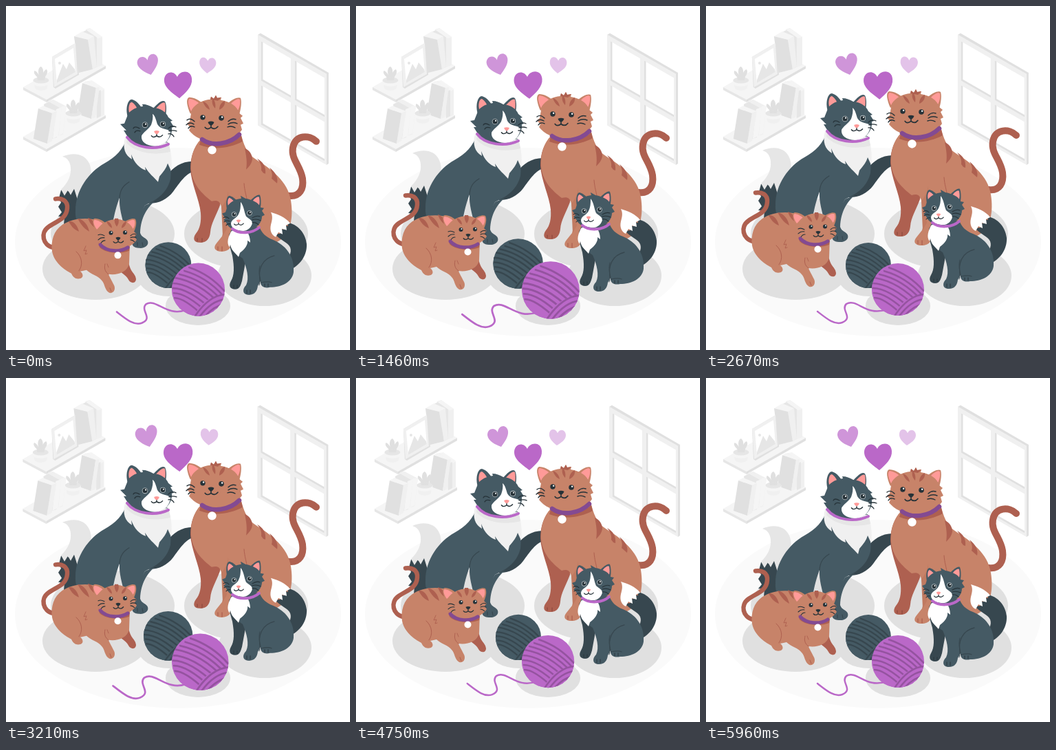
An HTML page with a canvas for the animation above (6 s loop, 500 by 500 pixels).

```html
<!DOCTYPE html>
<html lang="en">
<head>
<meta charset="utf-8">
<title>Cat family</title>
<style>
html, body { margin: 0; width: 100%; height: 100%; overflow: hidden; background: #fff; }
canvas { display: block; width: 100vw; height: 100vh; }
</style>
</head>
<body>
<canvas id="stage"></canvas>
<script>
const canvas = document.getElementById('stage');
const g = canvas.getContext('2d');
const LOOP = 6000, LEAD = 40;

const INK = '#263238', SLATE = '#455a64', DEEP = '#37474f';
const FUR = '#c78369', RUST = '#ae6050', PINK = '#ff9a98';
const LILAC = '#ba68c8', PLUM = '#834a92';
const G1 = '#fafafa', G2 = '#f5f5f5', G3 = '#f0f0f0', G4 = '#e6e6e6', G5 = '#e0e0e0';

const cache = new Map();
function path(d) {
  if (!cache.has(d)) cache.set(d, new Path2D(d));
  return cache.get(d);
}
function fill(d, c) { g.fillStyle = c; g.fill(path(d)); }
function line(d, c, w) {
  g.strokeStyle = c;
  g.lineWidth = w;
  g.lineCap = g.lineJoin = 'round';
  g.stroke(path(d));
}
function oval(x, y, rx, ry, c) {
  g.fillStyle = c;
  g.beginPath();
  g.ellipse(x, y, rx, ry, 0, 0, Math.PI * 2);
  g.fill();
}
function dot(x, y, r, c) { oval(x, y, r, r, c); }

// Piecewise linear value through [position, value] stops
function track(stops, p) {
  for (let i = 1; i < stops.length; i++) {
    const [a, u] = stops[i - 1], [b, v] = stops[i];
    if (p <= b) return u + (v - u) * (p - a) / (b - a);
  }
  return stops[stops.length - 1][1];
}
const BEAT = [[0, 1], [.1, 1.1], [.3, 1], [.4, 1], [.5, 1.1], [.6, 1], [1, 1]];
const SHAKE = [0, -1, 2, -4, 4, -4, 4, -4, 2, -1, 0].map((v, i) => [i / 10, v]);
const FLOAT = [[0, 0], [.5, -10], [1, 0]];

function shifted(x, y, draw) {
  g.save();
  g.translate(x, y);
  draw();
  g.restore();
}
function scaled(k, x, y, draw) {
  g.save();
  g.translate(x, y);
  g.scale(k, k);
  g.translate(-x, -y);
  draw();
  g.restore();
}

function floor() {
  oval(250, 343, 237, 137, G1);
  oval(155, 331, 90, 51, G5);
  oval(349, 331, 90, 51, G5);
  oval(130, 382, 77, 45, G5);
  oval(376, 392, 68, 44, G5);
  oval(237, 396, 44, 26, G5);
  oval(279, 436, 47, 28, G5);
}

function board(y) {
  shifted(0, y, () => {
    fill('M25 0 L112 -50 L145 -31 L59 18Z', G2);
    fill('M25 0 L59 18 V22 L25 4Z', G4);
    fill('M59 18 L145 -31 V-27 L59 22Z', G5);
  });
}
function pot(x, y) {
  shifted(x, y, () => {
    fill('M-3 -4 C-11 -9 -11 -14 -9 -15 C-5 -13 -3 -9 -2 -5 C-6 -15 -3 -20 0 -21 C4 -18 4 -12 2 -5 C2 -12 5 -16 8 -17 C11 -13 8 -8 3 -3Z', G5);
    fill('M-10 3 L-9 10 C-7 15 7 15 9 10 L10 3Z', G3);
    fill('M-11.5 -1 V4 C-9 9 9 9 11.5 4 V-1Z', G2);
    oval(0, -1, 11.5, 4.5, G4);
    fill('M-5 -1 L-6 -9 L0 -5 L1 -15 L3 -5 L7 -10 L5 -1Z', G5);
  });
}
function shelf() {
  board(118);
  fill('M116 34 L122 32 L140 45 V86 L130 90Z', G3);
  fill('M111 38 L117 35 L132 44 V88 L126 92Z', G4);
  fill('M117 35 L122 32 L140 45 L134 47Z', G2);
  fill('M99 44 L111 37 L128 44 L119 50Z', G2);
  fill('M99 44 L119 49 L126 92 L106 97Z', G5);
  fill('M119 49 L128 44 L132 88 L126 92Z', G3);
  fill('M67 74 L101 54 L104 56 L106 100 L72 120 L69 118Z', G5);
  fill('M67 74 L101 54 L104 99 L70 118Z', G3);
  fill('M71 77 L98 61 L101 96 L74 112Z', '#fff');
  fill('M74 108 L83 84 L88 92 L92 82 L100 92 L101 96 L74 112Z', G4);
  dot(78, 83, 2, G4);
  pot(51, 109);

  board(190);
  fill('M113 112 L119 109 L143 122 V158 L132 163Z', G3);
  fill('M119 109 L125 108 L144 121 L138 124Z', G2);
  fill('M132 125 L138 122 V160 L132 163Z', G4);
  fill('M111 112 L131 118 L124 164 L104 157Z', G5);
  fill('M111 112 L116 109 L136 118 L131 119Z', G2);
  fill('M131 119 L136 118 L130 162 L124 164Z', G3);
  fill('M62 137 L69 136 L88 146 L83 187 L70 190Z', G3);
  fill('M55 143 L62 139 L80 149 L74 191 L62 195Z', G4);
  fill('M73 150 L81 147 L76 189 L68 193Z', G2);
  fill('M81 146 L88 145 L83 185 L77 188Z', G2);
  fill('M47 149 L54 145 L74 153 L67 156Z', G2);
  fill('M47 149 L67 156 L60 200 L40 193Z', G5);
  fill('M67 156 L74 153 L67 196 L60 200Z', G3);
  pot(98, 157);
}

function windowFrame() {
  fill('M366 42 L370 39.5 L469 97 V229 L466 231 V99Z', G5);
  g.save();
  g.transform(1, .575, 0, 1, 366, 41.5);
  g.fillStyle = G3;
  g.fillRect(0, 0, 100, 132);
  for (const u of [5, 54]) for (const v of [7, 71]) {
    g.fillStyle = G5;
    g.fillRect(u, v, 43, 57);
    g.fillStyle = '#fff';
    g.fillRect(u + 2.5, v, 40.5, 54);
  }
  g.restore();
}

function hearts() {
  fill('M211 100 C203 97 192 92 191 83 C191 73 202 71 206 79 C207 68 219 67 221 77 C222 85 216 93 211 100Z', '#cf95d9');
  fill('M252 134 C243 127 230 119 230 108 C230 96 243 92 249 103 C253 93 269 92 270 106 C271 117 261 126 252 134Z', LILAC);
  fill('M292 98 C287 94 280 88 281 81 C282 73 290 73 293 80 C296 73 305 75 305 83 C305 90 298 94 292 98Z', '#e3c3e9');
}

function eye(x, y, r, ring) {
  if (ring) dot(x, y, r + .8, '#b9c2c6');
  dot(x, y, r, INK);
  dot(x + r * .3, y - r * .35, r * .32, '#fff');
}
function snout(x, y, s, c) {
  g.save();
  g.translate(x, y);
  g.scale(s, s);
  fill('M-4 -2 Q0 -4 4 -2 Q4 0 0 3 Q-4 0 -4 -2Z', c);
  line('M0 3 V5 M-8 5 Q-5 9 0 5 Q5 9 9 4', INK, 1.5);
  g.restore();
}

function blackCat() {
  fill('M80 268 L87 266 L91 270 L97 264 L108 272 L105 318 H84 L85 307 L76 306 L81 300 L76 292 L80 286 L77 279Z', DEEP);
  fill('M82 219 C98 212 115 215 121 229 C125 238 124 247 121 254 L104 282 L99 266 L94 275 L90 268 L85 276 L80 267 C91 256 95 246 94 235 C93 226 89 221 82 219Z', G4);
  fill('M205 272 C230 262 236 226 272 226 L274 241 C262 242 252 258 243 270 C234 282 220 288 207 287Z', DEEP);
  fill('M176 190 C171 209 159 220 143 229 C120 242 101 268 101 298 C100 314 108 330 135 332 C146 331 155 322 156 311 C159 296 162 287 165 279 C164 294 169 307 172 323 C176 338 180 340 185 341 C181 348 186 352 193 352 C202 353 208 348 206 342 C204 337 197 337 195 330 C193 316 196 301 202 290 C216 283 233 275 239 252 C241 235 238 215 235 198Z', SLATE);
  fill('M194 333 C190 321 194 302 202 290 L216 284 C205 294 196 307 195 330Z', SLATE);
  line('M191 344 V349 M198 344 L199 349', DEEP, 1.2);
  line('M165 279 C166 266 171 261 179 256', DEEP, 1.2);
  fill('M173 191 C169 207 173 217 183 223 L182 216 C187 229 194 236 203 239 L202 234 C208 244 215 249 221 256 L223 248 C229 241 233 236 235 229 L240 240 C242 225 240 212 236 199Z', '#f0f0f0');
  fill('M176 193 C190 207 213 212 237 202 L239 212 C213 219 186 212 175 199Z', G4);

  fill('M177 162 C173 149 177 136 183 136 C190 138 196 145 199 152Z', SLATE);
  fill('M180 158 C176 148 180 139 183 140 C188 143 191 149 192 154Z', PINK);
  fill('M214 149 C221 141 227 136 231 139 C234 145 233 153 232 160Z', SLATE);
  fill('M218 149 C224 142 229 139 231 141 C232 147 232 151 231 155Z', PINK);
  fill('M178 156 C186 148 193 147 199 146 L198 143 C204 143 209 145 214 148 C224 149 232 153 236 162 L242 167 L239 168 L244 176 L241 177 C242 188 235 201 219 204 C201 207 184 201 176 189 L171 181 L175 181 L166 172 L172 171Z', SLATE);
  fill('M213 157 C217 160 218 166 220 172 C224 180 235 178 239 183 C238 196 228 204 216 204 C204 203 196 198 197 189 C199 184 207 180 211 173 C213 167 214 162 213 157Z', '#fff');
  eye(202, 173, 3.5, true);
  eye(228, 172, 3.3, true);
  snout(219, 184, .95, PINK);
  line('M194 178 Q187 174 185 178 M195 182 Q189 180 187 184 M236 178 Q241 173 247 176 M237 182 Q243 180 248 182 M236 186 Q241 185 244 190', INK, 1.3);
  line('M176 191 C188 207 217 210 236 201', LILAC, 4);
}

function orangeCat() {
  line('M411 276 C427 278 433 266 431 251 C428 232 414 223 417 206 C420 187 441 187 451 197', RUST, 10);
  fill('M285 194 C274 202 268 219 268 237 C269 258 281 281 283 301 C284 314 282 324 276 331 C271 338 273 344 281 344 C291 345 296 339 297 329 C298 316 305 306 311 290 L320 250Z', RUST);
  fill('M284 193 C271 206 268 224 269 239 C272 261 285 273 299 284 C306 282 311 283 313 292 C316 309 318 324 314 335 L306 345 C301 351 303 356 311 357 C325 358 328 350 330 340 C342 350 375 353 396 342 C414 333 418 307 414 283 C410 255 385 237 363 223 C350 215 345 201 341 184Z', FUR);
  line('M308 350 V355 M314 350 V356', RUST, 1.3);
  line('M278 338 V342 M285 338 V343', '#8d493e', 1.2);
  fill('M313 292 C318 287 322 279 323 270 C324 295 319 311 321 324 L315 335Z', '#c07a61');
  line('M346 258 C347 270 349 274 350 281', RUST, 1);
  fill('M347 207 C354 210 358 216 358 223 C357 230 353 234 349 238 C351 227 349 217 347 207Z', RUST);
  fill('M365 222 C374 227 378 234 377 244 L374 243 L371 239 C372 232 369 227 365 222Z', RUST);
  fill('M383 235 C392 242 396 250 394 258 L386 251 C388 245 386 240 383 235Z', RUST);
  fill('M283 195 C300 207 327 202 342 189 L344 197 C326 207 301 210 281 202Z', RUST);

  fill('M268 157 C263 146 261 135 266 133 C273 133 281 137 287 143Z', FUR);
  fill('M269 153 C264 144 264 136 267 135 C273 136 278 139 281 142Z', PINK);
  fill('M322 142 C329 135 338 132 341 134 C343 140 341 151 339 158Z', FUR);
  fill('M326 143 C332 136 338 134 340 136 C341 143 339 148 337 152Z', PINK);
  fill('M270 151 C276 142 286 137 297 136 L298 132 L302 135 L305 130 L307 134 L313 133 L312 137 C326 139 336 146 339 156 L344 160 L341 163 L345 171 L341 173 L343 180 C337 190 321 197 303 197 C286 197 274 191 266 181 L268 177 L263 171 L267 168Z', FUR);
  fill('M300 135 C304 137 305 144 304 149 C300 145 299 140 300 135Z', RUST);
  fill('M286 139 C291 140 295 145 296 151 C291 149 288 144 286 139Z', RUST);
  fill('M318 138 C319 144 315 149 310 151 C310 145 313 140 318 138Z', RUST);
  fill('M297 136 L298 132 L302 135 L305 130 L307 134 L313 133 L308 138Z', RUST);
  eye(286, 162, 3.7);
  eye(313, 163, 3.8);
  snout(298, 171, 1.1, INK);
  line('M274 168 Q268 162 263 166 M273 172 Q267 168 262 173 M274 176 Q268 173 265 178 M323 168 Q328 163 334 165 M323 172 Q329 168 336 171 M322 176 Q328 174 333 177', INK, 1.4);
  line('M285 194 C300 205 325 201 339 187', PLUM, 6.5);
  dot(299.5, 209.5, 6.2, '#fff');
}

function gingerKitten() {
  line('M68 351 C54 348 49 330 62 321 C73 313 88 310 89 294 C90 283 81 279 72 280.5', RUST, 6.5);
  fill('M158 377 C166 389 174 390 178 398 C181 404 189 404 189 397 C188 388 181 389 178 372Z', RUST);
  fill('M138 313 C118 306 96 309 82 318 C69 327 65 342 67 357 C70 373 84 383 95 389 C98 396 103 398 109 396 C113 394 112 389 108 386 L117 384 C124 391 134 392 139 399 C144 404 143 413 150 417 C156 419 160 412 157 406 C153 398 150 393 149 390 C160 392 176 388 179 375 L180 345Z', FUR);
  line('M102 357 C111 365 112 377 106 385 M144 375 C142 383 145 387 149 390', RUST, 1);
  line('M116 349 L113 356 L117 355 L115 361 L118 360 M147 375 L149 380', RUST, .9);
  fill('M91 313 C99 312 104 320 106 328 C98 325 94 319 91 313Z', RUST);
  fill('M104 309 C114 311 119 319 121 328 C112 323 108 316 104 309Z', RUST);
  fill('M119 308 C126 310 131 318 132 324 C124 320 121 314 119 308Z', RUST);
  line('M151 410 L153 415', RUST, 1);
  fill('M134 343 C145 358 170 358 180 349 L179 356 C167 361 145 360 136 351Z', RUST);

  fill('M132 330 C126 319 124 310 129 309 C136 309 142 313 146 317Z', FUR);
  fill('M132 325 C127 318 126 312 129 311 C135 312 139 315 141 317Z', PINK);
  fill('M169 316 C177 310 185 308 188 310 C191 315 188 325 185 330Z', FUR);
  fill('M173 317 C179 311 186 310 187 312 C188 317 187 321 184 325Z', PINK);
  fill('M133 325 C139 315 149 311 161 310 C174 311 183 317 186 328 L190 332 L187 335 L190 340 C184 350 171 354 159 353 C146 353 137 349 131 341 L132 338 L127 334 L131 331Z', FUR);
  fill('M158 309 H163 C165 314 163 318 161 321 C158 317 157 313 158 309Z', RUST);
  fill('M146 313 C151 314 154 318 154 323 C150 321 147 317 146 313Z', RUST);
  fill('M175 313 C175 318 172 322 168 323 C168 318 171 315 175 313Z', RUST);
  eye(152.5, 330, 3);
  eye(173, 329.5, 3);
  snout(163, 338.5, .85, INK);
  line('M143 334 Q138 331 134 333 M143 337 Q138 336 134 340 M144 341 Q140 341 138 345 M181 334 Q185 330 189 332 M181 337 Q185 335 189 337 M181 340 Q184 340 187 343', INK, 1.1);
  line('M137 347 C147 358 166 358 177 351', PLUM, 5);
  dot(162.5, 362.5, 5, '#fff');
}

function blackKitten() {
  fill('M410 385 C428 378 438 362 437 346 C435 329 423 317 409 315 L410 320 L403 319 L404 325 L397 324 L399 331 L391 332 C399 341 410 344 413 351 C416 359 411 367 403 371Z', DEEP);
  fill('M385 300 C395 303 406 307 413 316 L407 319 L408 326 L401 324 L402 332 L396 329 L392 336 C386 333 383 327 385 318 C387 311 388 306 385 300Z', '#fff');
  fill('M325 330 C322 341 326 352 329 363 C332 380 332 392 327 400 C323 407 326 412 333 412 C340 412 341 406 343 400 L348 373Z', DEEP);
  fill('M327 326 C323 344 332 359 344 367 C350 381 354 396 349 406 C343 412 344 419 351 420 C361 421 365 415 366 407 L370 400 C369 408 376 411 384 409 C400 409 416 402 418 387 C420 363 405 347 388 340 C377 336 372 330 368 321Z', SLATE);
  line('M370 400 C365 383 373 367 390 363 M371 402 C376 401 382 400 386 402', DEEP, 1.3);
  line('M350 413 V418 M355 413 V418 M331 406 V410 M336 406 V410 M376 404 V408 M381 404 V408', INK, .9);
  line('M368 406 C371 396 366 388 369 378', DEEP, 1);
  fill('M328 327 C323 335 320 345 325 351 L326 347 C327 355 333 359 338 365 L340 359 C347 354 352 347 351 341 L355 344 C355 336 352 330 349 326Z', '#fff');

  fill('M321 296 C319 285 321 276 325 276 C331 278 335 282 338 286Z', SLATE);
  fill('M323 291 C321 284 323 279 325 279 C329 281 332 285 333 287Z', PINK);
  fill('M354 284 C360 278 366 273 369 275 C371 281 371 289 369 297Z', SLATE);
  fill('M357 285 C362 279 366 276 368 278 C369 284 369 288 367 292Z', PINK);
  fill('M322 291 C328 283 335 281 342 280 L341 276 L348 280 C359 282 367 286 370 293 L375 294 L372 298 L376 304 L372 306 C372 318 360 327 345 328 C333 328 323 323 320 315 L316 311 L319 309 L314 302 L319 300Z', SLATE);
  fill('M341 285 C346 291 346 300 349 306 C353 310 358 311 358 316 C356 324 349 328 342 327 C332 326 327 322 327 316 C328 310 335 309 338 303 C341 297 341 292 341 285Z', '#fff');
  eye(331.5, 303, 2.9, true);
  eye(354, 301, 2.9, true);
  snout(338, 313, .8, PINK);
  line('M324 309 Q320 305 316 308 M325 313 Q320 311 317 314 M326 317 Q322 316 320 319 M358 308 Q364 304 369 306 M358 311 Q364 309 370 312 M358 315 Q363 314 367 318', INK, 1.1);
  line('M329 324 C339 332 358 331 368 322', LILAC, 4);
}

function ball(x, y, r, base, dark) {
  g.save();
  g.translate(x, y);
  g.scale(r / 38, r / 38);
  dot(0, 0, 38, base);
  g.clip();
  for (let i = 0; i < 4; i++) {
    const k = i * 7;
    line(`M${-34 + k} ${-17 - k * .7} Q${2 + k * .7} ${-11 - k * .5} ${33 + k * .2} ${23 - k}`, dark, 2.6);
  }
  fill('M-40 -10 C-20 -14 8 4 30 26 L20 40 H-40Z', base);
  for (let i = 0; i < 4; i++) {
    const k = i * 7;
    line(`M${-38 + k * .2} ${-9 + k} Q${-10 - k * .5} ${-9 + k} ${28 - k} ${27 + k * .5}`, dark, 2.6);
  }
  fill('M40 8 C20 9 4 15 -7 40 L40 40Z', base);
  for (let i = 0; i < 4; i++) {
    const k = i * 7;
    line(`M38 ${7 + k} Q${14 + k * .6} ${9 + k} ${-6 + k} 40`, dark, 2.6);
  }
  g.restore();
}
function yarn() {
  ball(236, 377, 33, SLATE, DEEP);
  line('M162 444 C176 455 187 464 198 460 C215 453 195 442 204 433 C219 424 233 452 262 441', LILAC, 2.5);
  ball(279, 412, 38, LILAC, '#9553a0');
}

function frame(now) {
  const t = (now + LEAD) % LOOP, p = t / LOOP;
  const sway = track(SHAKE, p);
  const w = innerWidth, h = innerHeight, dpr = devicePixelRatio || 1;
  const cw = Math.round(w * dpr), ch = Math.round(h * dpr);
  if (canvas.width !== cw || canvas.height !== ch) {
    canvas.width = cw;
    canvas.height = ch;
  }
  g.setTransform(1, 0, 0, 1, 0, 0);
  g.fillStyle = '#fff';
  g.fillRect(0, 0, cw, ch);
  g.setTransform(cw / 500, 0, 0, ch / 500, 0, 0);

  floor();
  shifted(sway, 0, shelf);
  shifted(sway, 0, windowFrame);
  scaled(track(BEAT, p), 248, 101.5, hearts);
  shifted(0, track(FLOAT, p), () => {
    blackCat();
    orangeCat();
    gingerKitten();
    blackKitten();
  });
  scaled(track(BEAT, t % 3000 / 3000), 239.5, 402.5, yarn);
}

const start = performance.now();
function loop() {
  frame(performance.now() - start);
  requestAnimationFrame(loop);
}
loop();
</script>
</body>
</html>
```
